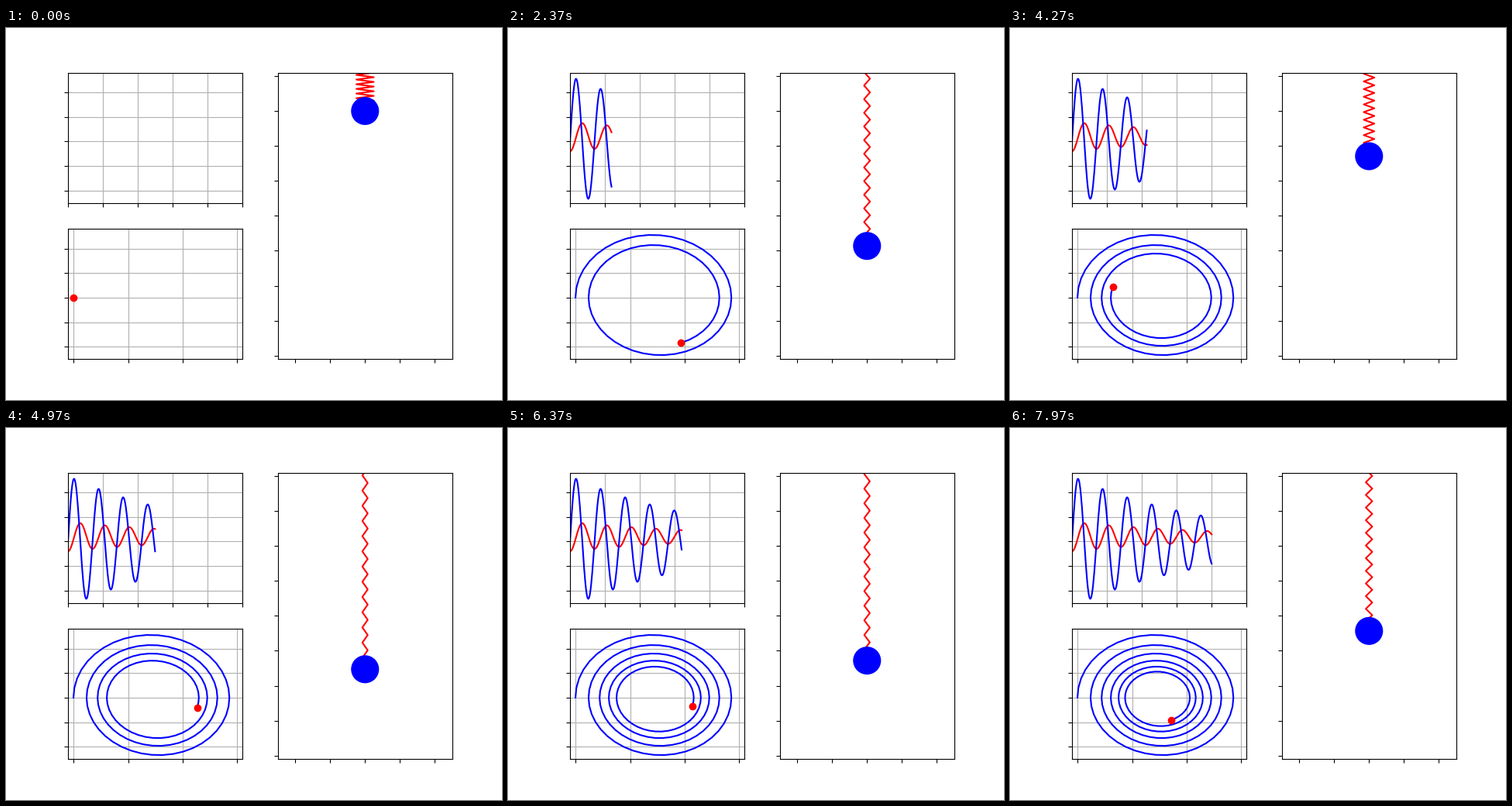
Write a matplotlib script that moves like this. It is 640x480 px and loops after 8 s.

```python
import numpy as np
import matplotlib.pyplot as plt
from matplotlib.animation import FuncAnimation

LOOP_MS = 8000
FRAMES = 240

# Damped mass on a spring, released at rest from x = -2
OMEGA2 = 20.0
GAMMA = 0.125
REST = 0.981
START = -2.0

ANCHOR = -4.0
COILS = 15
RADIUS = 0.4

t = np.linspace(0, 10, 300)
omega = np.sqrt(OMEGA2 - GAMMA ** 2)
amp = START - REST
decay = amp * np.exp(-GAMMA * t)
x = REST + decay * (np.cos(omega * t) + GAMMA / omega * np.sin(omega * t))
v = -decay * OMEGA2 / omega * np.sin(omega * t)

# Zigzag sampled four times per coil
turns = np.arange(4 * COILS + 1)
zigzag = np.array([0, -1, 0, 1])[turns % 4]


def spring_points(end):
    length = end - ANCHOR
    return zigzag * 0.5 / length, ANCHOR + length * turns / turns[-1]


fig = plt.figure(figsize=(6.4, 4.8), dpi=100)
ax_time = fig.add_subplot(2, 2, 1)
ax_phase = fig.add_subplot(2, 2, 3)
ax_ball = fig.add_subplot(1, 2, 2)

ax_time.set(xlim=(0, 10), xticks=range(0, 11, 2))
ax_phase.set(xlim=(-2.2, 4.2), xticks=range(-2, 5, 2))
for ax in (ax_time, ax_phase):
    ax.set(ylim=(-12.5, 14), yticks=range(-10, 11, 5))
    ax.grid(True)

# Same scale on both axes of the tall panel
box = ax_ball.get_window_extent()
half = 2.5 * box.height / box.width
ax_ball.set(xlim=(-2.5, 2.5), ylim=(1 + half, 1 - half),
            xticks=range(-2, 3), yticks=range(-3, 6))

for ax in fig.axes:
    ax.tick_params(labelbottom=False, labelleft=False)

x_line, = ax_time.plot([], [], "r")
v_line, = ax_time.plot([], [], "b")
orbit, = ax_phase.plot([], [], "b")
dot, = ax_phase.plot([], [], "ro")
spring, = ax_ball.plot([], [], "r")
ball = plt.Circle((0, START), RADIUS, fc="b", lw=0, zorder=3)
ax_ball.add_patch(ball)


def update(i):
    n = i + 1
    x_line.set_data(t[:n], x[:n])
    v_line.set_data(t[:n], v[:n])
    orbit.set_data(x[:n], v[:n])
    dot.set_data([x[i]], [v[i]])
    spring.set_data(*spring_points(x[i]))
    ball.center = 0, x[i]
    return x_line, v_line, orbit, dot, spring, ball


def init():
    return update(0)


anim = FuncAnimation(fig, update, frames=FRAMES, init_func=init,
                     interval=LOOP_MS / FRAMES, repeat=True, repeat_delay=0)
plt.show()
```
